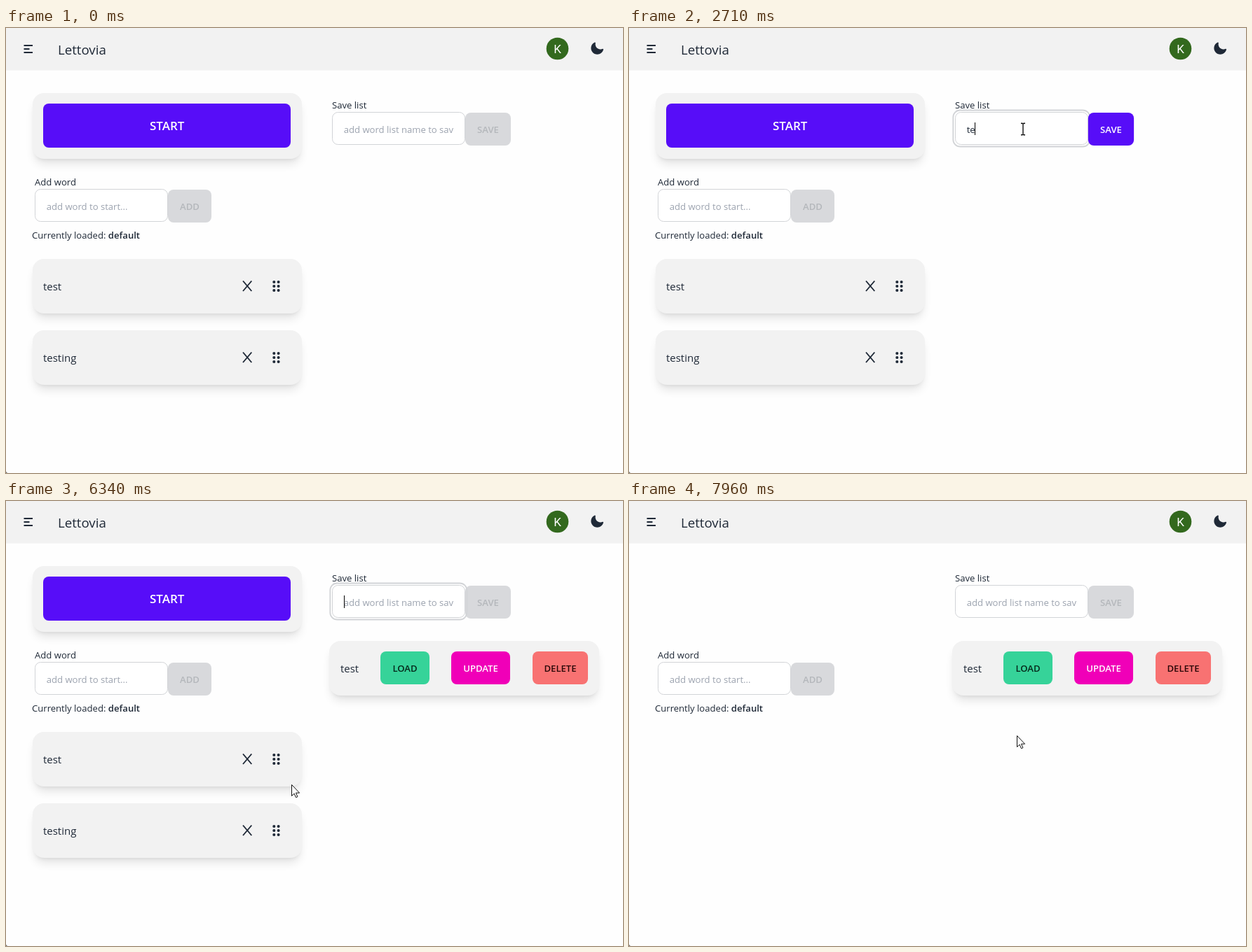
Recreate the animation shown at these times as an HTML page. Size 880 by 636 pixels, loop 7.99 s.

```html
<!DOCTYPE html>
<html lang="en">
<head>
<meta charset="utf-8">
<title>Word lists</title>
<style>
html, body { margin: 0; width: 100%; height: 100%; overflow: hidden; background: #fefefe; }
svg { display: block; width: 100vw; height: 100vh; }
text { font-family: "Open Sans", "Noto Sans", sans-serif; font-size: 13.1px; fill: #1f2937; white-space: pre; }
.word { font-size: 15px; }
.hint { fill: #9ca3af; }
.bold { font-weight: 600; }
.mid { text-anchor: middle; font-weight: 600; }
.btn { transform-box: fill-box; transform-origin: center; }
</style>
</head>
<body>
<svg id="stage" viewBox="0 0 880 636" xmlns="http://www.w3.org/2000/svg"></svg>
<script>
const LOOP = 7990;
const INK = "#1f2937", PRIMARY = [87, 13, 248], MUTED = [216, 217, 220];
const SAVE_ON = 2500, SAVE_OFF = 4990;
const FIRST_GONE = 6810, SECOND_GONE = 7230;

const rect = (x, y, w, h, r, attrs) =>
  `<rect x="${x}" y="${y}" width="${w}" height="${h}" rx="${r}" ${attrs}/>`;
const label = (x, y, s, attrs = "") => `<text x="${x}" y="${y}" ${attrs}>${s}</text>`;

const card = (x, y, w, h) =>
  rect(x + 3, y + 13, w - 6, h - 6, 13, 'opacity=".1" filter="url(#soft)"') +
  rect(x + 4, y + 8, w - 8, h - 8, 12, 'opacity=".1" filter="url(#tight)"') +
  rect(x, y, w, h, 16, 'fill="#f2f2f2"');

const field = (x, y) =>
  rect(x + .5, y + .5, 189, 46, 8, 'fill="#fff" stroke="#d2d4d7"');

const button = (id, x, y, w, fill, ink, s) =>
  `<g id="${id}" class="btn">${rect(x, y, w, 47, 8, `fill="${fill}"`)}
  ${label(x + w / 2, y + 28.5, s, `class="mid" style="fill:${ink}"`)}</g>`;

function wordCard(id, s) {
  let dots = "";
  for (let i = 0; i < 6; i++)
    dots += `<circle cx="${382.3 + i % 2 * 6.3}" cy="${363 + (i >> 1) * 6}" r="2.05"/>`;
  return `<g id="${id}">${card(38, 330, 384, 78)}
    ${rect(321, 345, 46, 48, 8, `class="hover" fill="${INK}" fill-opacity="0"`)}
    ${label(53, 375, s, 'class="word"')}
    <path d="M338 361.5L350.3 376M350.3 361.5L338 376" stroke="${INK}" stroke-width="1.9"/>
    <g fill="${INK}">${dots}</g></g>`;
}

const stage = document.getElementById("stage");
stage.innerHTML = `
<defs>
  <filter id="soft" x="-20%" y="-50%" width="140%" height="200%"><feGaussianBlur stdDeviation="7"/></filter>
  <filter id="tight" x="-20%" y="-50%" width="140%" height="200%"><feGaussianBlur stdDeviation="3"/></filter>
</defs>
${rect(0, 0, 880, 636, 0, 'fill="#fefefe"')}
${rect(0, 0, 880, 60.5, 0, 'fill="#f2f2f2"')}
<path d="M25.5 25H38M25.5 30H33.5M25.5 35H38" stroke="${INK}" stroke-width="1.8"/>
${label(74, 37.5, "Lettovia", 'style="font-size:18.7px;font-weight:500"')}
<circle cx="786.5" cy="29.5" r="15.8" fill="#33691e"/>
${label(786.5, 35.7, "K", 'text-anchor="middle" style="font:17px Roboto,sans-serif;fill:#fff"')}
<path transform="translate(832.5 18.4) scale(.89)" fill="${INK}" d="M21.6 13a1 1 0 0 0-1-.14A8.1 8.1 0 0 1 9.1 5.5a8.6 8.6 0 0 1 .25-2A1 1 0 0 0 8 2.4 10.1 10.1 0 1 0 22 14a1 1 0 0 0-.4-1Z"/>
<g id="start">${card(38, 93, 384, 94)}
  ${rect(53, 108, 353, 63, 8, 'fill="#570df8"')}
  ${label(229.7, 146.3, "START", 'class="mid" style="font-size:17px;fill:#fff"')}</g>
${label(41, 225, "Add word")}
${field(41, 230)}
${label(57.7, 259.5, "add word to start...", 'class="hint"')}
${button("add", 231, 231, 62, "#d8d9dc", "#b4b7bb", "ADD")}
${label(37, 301, 'Currently loaded: <tspan class="bold">default</tspan>')}
${wordCard("second", "testing")}
${wordCard("first", "test")}
${label(465, 115, "Save list")}
${field(465, 120)}
<g id="ringUnder"></g>
${button("save", 655, 121, 65, "", "", "SAVE")}
${rect(462.3, 117.5, 195, 52, 10, 'id="ring" fill="none" stroke="#d2d4d7" stroke-width="1.8"')}
${label(481.7, 149.5, "add word list name to sav", 'id="hint" class="hint"')}
${label(481.7, 149.5, "", 'id="typed"')}
<path id="caret" d="M.5 135V153" stroke="#111" stroke-width="1.1"/>
<g id="saved">${card(461, 200, 385, 78)}
  ${label(477, 245, "test", 'class="word"')}
  ${button("load", 534, 215, 70, "#36d399", "#06291b", "LOAD")}
  ${button("update", 635, 215, 84, "#f000b8", "#fff", "UPDATE")}
  ${button("delete", 751, 215, 79, "#f87272", "#2a0808", "DELETE")}</g>
<path d="M0 633.5Q.5 635.5 2.5 636H0Z" fill="#666"/>
<g id="pointer">
  <path id="arrow" d="M.5 .5V16.5L4.1 13.1 6.5 18.7 8.9 17.7 6.5 12.2H11.6Z" fill="#fff" stroke="#111"/>
  <path id="beam" d="M-3-7.8H-1L0-7 1-7.8H3M0-7V8M-3 8.8H-1L0 8 1 8.8H3" fill="none" stroke="#111" stroke-width="1.4"/>
  <path id="hand" d="M-1.5 12V1.5Q0-.5 1.5 1.5V7Q3 5.5 4.5 7.5 6 6 7.5 8 9.5 7 10.5 9.5V14L8.5 20H0.5L-5.5 12Q-5 9.5-3 10.5Z" fill="#fff" stroke="#111"/>
</g>`;

const el = {};
stage.querySelectorAll("[id]").forEach(n => el[n.id] = n);
const saveBox = el.save.querySelector("rect"), saveText = el.save.querySelector("text");
const hover = id => el[id].querySelector(".hover");

const clamp = v => Math.min(1, Math.max(0, v));
const ramp = (t, from, to) => clamp((t - from) / (to - from));
const smooth = k => k * k * (3 - 2 * k);
const show = (node, on) => node.setAttribute("display", on ? "inline" : "none");
const mix = (a, b, k) => `rgb(${a.map((v, i) => Math.round(v + (b[i] - v) * k))})`;

// time, x, y of the pointer
const PATH = [
  [260, 845, 632], [500, 745, 430], [760, 640, 262], [950, 577, 170], [1050, 564, 148], [1110, 562, 143.5],
  [6010, 562, 143.5], [6130, 508, 248], [6340, 407, 404], [6430, 380, 409], [6580, 352, 394], [6710, 346, 385],
  [7400, 346, 385], [7520, 377, 462], [7620, 395, 489], [7760, 454, 432], [7960, 553, 335], [7990, 553, 335]
];

// Hermite curve through the path; still wherever a stop is held
function pointerAt(t) {
  if (t < PATH[0][0]) return null;
  let i = 0;
  while (i < PATH.length - 2 && t >= PATH[i + 1][0]) i++;
  const a = PATH[i], b = PATH[i + 1], d = b[0] - a[0], u = clamp((t - a[0]) / d);
  const same = (p, q) => p[1] === q[1] && p[2] === q[2];
  const slope = (j, c) => {
    const p = PATH[Math.max(0, j - 1)], m = PATH[j], n = PATH[Math.min(PATH.length - 1, j + 1)];
    if (j && (same(p, m) || same(m, n))) return 0;
    return (n[c] - p[c]) / (n[0] - p[0]);
  };
  return [1, 2].map(c => {
    const h = smooth(u);
    return a[c] * (1 - h) + b[c] * h +
      d * (slope(i, c) * u * (1 - u) ** 2 - slope(i + 1, c) * u * u * (1 - u));
  });
}

function pop(t, from) {
  const k = ramp(t, from, from + 250);
  if (t < from || k === 1) return 1;
  return k < .4 ? .98 + .04 * smooth(k / .4) : 1.02 - .02 * smooth((k - .4) / .6);
}
const scale = (node, k) => node.style.transform = `scale(${k})`;

function caretOn(t) {
  if (t < 1250 || t >= FIRST_GONE) return false;
  const flips = [1800, 2300, 3400, 3930, 4460, 4990, 5480, 6010];
  return flips.filter(f => f <= t).length % 2 === 0;
}

function drawForm(t) {
  const focused = t >= 1250 && t < FIRST_GONE;
  const typing = t >= SAVE_ON && t < SAVE_OFF;
  const letters = typing ? [2500, 2620, 2740, 2870].filter(k => k <= t).length : 0;
  const lit = t < SAVE_OFF ? smooth(ramp(t, SAVE_ON, 2700)) : 1 - smooth(ramp(t, SAVE_OFF, 5180));

  el.typed.textContent = "test".slice(0, letters);
  show(el.hint, !letters);
  show(el.ring, focused);
  // an enabled button covers the focus ring
  if (lit > 0) el.save.before(el.ring); else el.save.after(el.ring);

  saveBox.setAttribute("fill", mix(MUTED, PRIMARY, lit));
  saveBox.setAttribute("stroke", mix(PRIMARY, PRIMARY, 0));
  saveBox.setAttribute("stroke-opacity", Math.sqrt(lit) * (t >= SAVE_OFF ? 1 : 0));
  saveText.style.fill = mix([180, 183, 187], [255, 255, 255], lit);
  scale(el.save, pop(t, SAVE_ON));

  show(el.caret, caretOn(t));
  const w = letters ? Math.round(el.typed.getComputedTextLength()) - 1 : 0;
  el.caret.setAttribute("transform", `translate(${482 + w})`);

  show(el.saved, t >= SAVE_OFF);
  for (const id of ["load", "update", "delete"]) {
    scale(el[id], pop(t, SAVE_OFF));
    el[id].querySelector("text").style.opacity = .6 + .4 * ramp(t, SAVE_OFF, 5250);
  }
}

function drawWords(t) {
  const rise = smooth(ramp(t, 6890, 7100));
  const left = 1 - ramp(t, SECOND_GONE, 7340);
  el.first.setAttribute("opacity", 1 - ramp(t, FIRST_GONE, 6875));
  el.second.setAttribute("opacity", left);
  el.second.setAttribute("transform", `translate(0 ${102 * (1 - rise)})`);
  el.start.setAttribute("opacity", left);
  hover("first").setAttribute("fill-opacity", .2 * ramp(t, 6520, 6700));
  hover("second").setAttribute("fill-opacity", .2 * ramp(t, 7060, 7220));
}

function drawPointer(t) {
  const p = pointerAt(t);
  show(el.pointer, p);
  if (!p) return;
  const [x, y] = p;
  const inField = x > 465 && x < 655 && y > 120 && y < 167;
  const live = t < FIRST_GONE || (t > 7060 && t < SECOND_GONE);
  const onCross = live && x > 321 && x < 367 && y > 345 && y < 393;
  show(el.beam, inField);
  show(el.hand, onCross);
  show(el.arrow, !inField && !onCross);
  el.pointer.setAttribute("transform", `translate(${Math.round(x)} ${Math.round(y)})`);
}

function draw(t) {
  drawForm(t);
  drawWords(t);
  drawPointer(t);
}

const began = performance.now();
function tick() {
  draw((performance.now() - began) % LOOP);
  requestAnimationFrame(tick);
}
tick();
</script>
</body>
</html>
```
